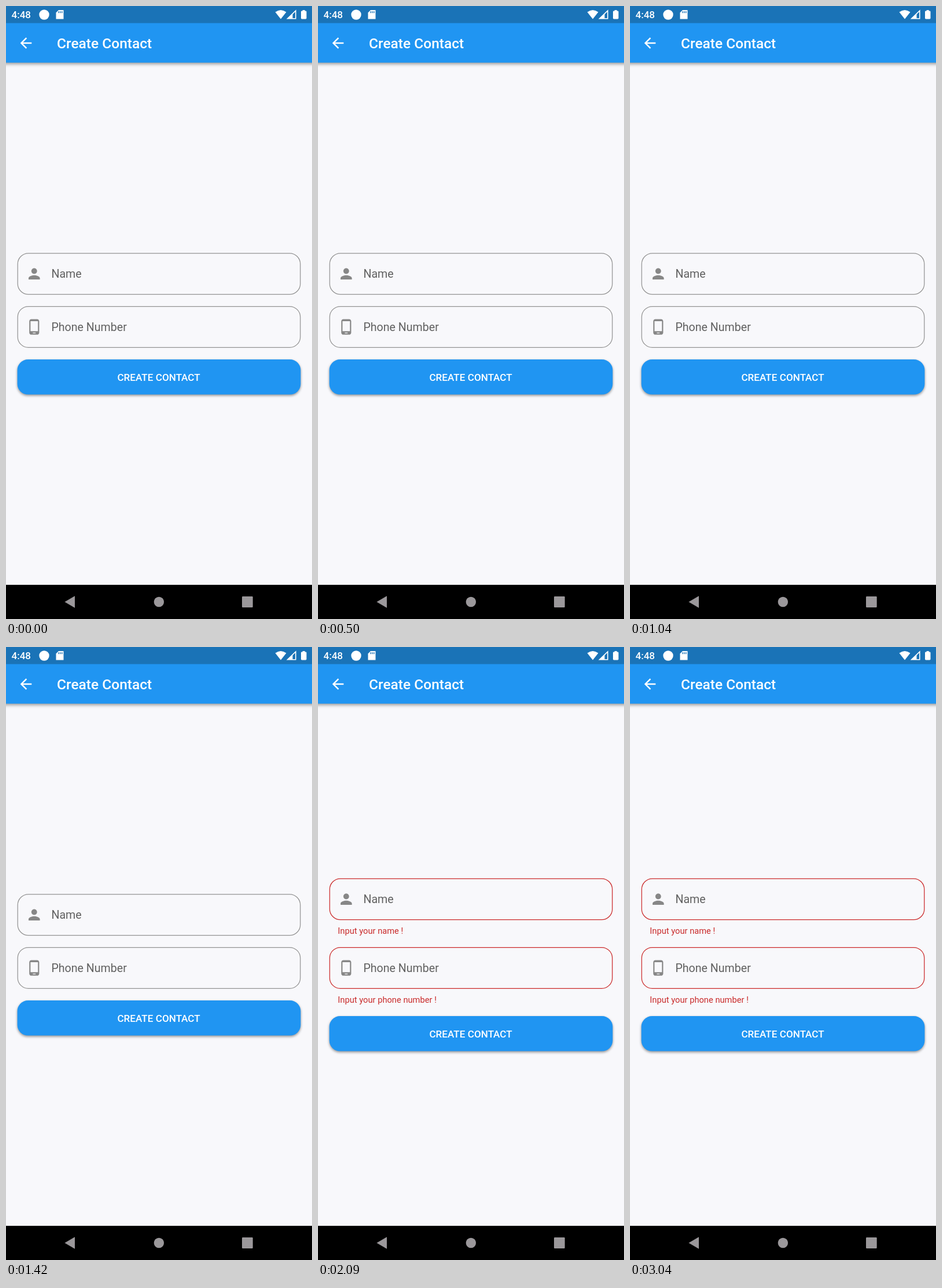
Animation, 529 px wide and 1058 px high, one loop 3210 ms. Source, as an HTML page with a canvas:

```html
<!DOCTYPE html>
<html lang="en">
<head>
<meta charset="utf-8">
<title>Create Contact</title>
<style>
  html, body { margin: 0; width: 100%; height: 100%; overflow: hidden; background: #f8f8fb; }
  canvas { display: block; width: 529px; height: 1058px; }
</style>
</head>
<body>
<canvas id="stage" width="529" height="1058"></canvas>
<script>
const ctx = document.getElementById('stage').getContext('2d');
const W = 529, LOOP = 3210, DP = 1.2245;
const TAP = 1510, RELEASE = 1590;
const BLUE = '#2095f2', GREY = [147, 147, 147], RED = [203, 42, 42];

const icons = {
  back: new Path2D('M20 11H7.83l5.59-5.59L12 4l-8 8 8 8 1.41-1.41L7.83 13H20v-2z'),
  person: new Path2D('M12 12c2.21 0 4-1.79 4-4s-1.79-4-4-4-4 1.79-4 4 1.79 4 4 4zm0 2c-2.67 0-8 1.34-8 4v2h16v-2c0-2.66-5.33-4-8-4z'),
  phone: new Path2D('M16 1H8C6.34 1 5 2.34 5 4v16c0 1.66 1.34 3 3 3h8c1.66 0 3-1.34 3-3V4c0-1.66-1.34-3-3-3zm-2 20h-4v-1h4v1zm3.25-3H6.75V4h10.5v14z')
};

const progress = (t, start, length) => Math.min(1, Math.max(0, (t - start) / length));
const easeOut = p => 1 - (1 - p) ** 2;

function text(str, x, y, size, color, weight = 400, align = 'left') {
  ctx.font = `${weight} ${size}px Roboto, sans-serif`;
  ctx.textAlign = align;
  ctx.fillStyle = color;
  ctx.fillText(str, x, y);
}

function icon(path, cx, cy, color) {
  ctx.save();
  ctx.translate(cx - 12 * DP, cy - 12 * DP);
  ctx.scale(DP, DP);
  ctx.fillStyle = color;
  ctx.fill(path);
  ctx.restore();
}

function polygon(...pts) {
  ctx.beginPath();
  pts.forEach(([x, y]) => ctx.lineTo(x, y));
  ctx.closePath();
}

function disc(x, y, r, color) {
  ctx.fillStyle = color;
  ctx.beginPath();
  ctx.arc(x, y, r, 0, Math.PI * 2);
  ctx.fill();
}

function box(x, y, w, h, r) {
  ctx.beginPath();
  ctx.roundRect(x, y, w, h, r);
}

function shadowFill(color, alpha, blur, dy) {
  ctx.save();
  ctx.shadowColor = `rgba(0,0,0,${alpha})`;
  ctx.shadowBlur = blur;
  ctx.shadowOffsetY = dy;
  ctx.fillStyle = color;
  ctx.fill();
  ctx.restore();
}

function drawStatusBar() {
  ctx.fillStyle = '#1a73b7';
  ctx.fillRect(0, 0, W, 29.5);
  text('4:48', 9.5, 21, 17, '#fff', 500);
  disc(66, 15, 8.7, '#fff');

  // memory card
  ctx.fillStyle = '#fff';
  polygon([91, 7], [99.5, 7], [99.5, 22.5], [86.5, 22.5], [86.5, 11.5]);
  ctx.fill();
  ctx.fillStyle = '#1a73b7';
  [90.5, 93.3, 96.1].forEach(x => ctx.fillRect(x, 9, 1.4, 3.2));

  // wifi
  ctx.fillStyle = '#fff';
  ctx.beginPath();
  ctx.moveTo(475, 22.5);
  ctx.lineTo(465.5, 10.5);
  ctx.quadraticCurveTo(475, 3.5, 484.5, 10.5);
  ctx.closePath();
  ctx.fill();

  // signal
  polygon([486.7, 21.7], [500.8, 21.7], [500.8, 8.2]);
  ctx.strokeStyle = '#fff';
  ctx.lineWidth = 1.6;
  ctx.stroke();
  polygon([486, 22], [495.5, 22], [495.5, 13]);
  ctx.fill();

  // battery
  box(510, 8.5, 9.5, 14, 1.4);
  ctx.fill();
  ctx.fillRect(512.7, 7, 4, 2);
}

function drawAppBar() {
  ctx.beginPath();
  ctx.rect(-10, 20, W + 20, 77.8);
  shadowFill(BLUE, 0.42, 6, 2.5);
  icon(icons.back, 34.5, 64, '#fff');
  text('Create Contact', 88, 73, 24.5, '#fff', 500);
}

function drawField(cy, glyph, label, color) {
  box(20.2, cy - 35.4, 488.6, 70.8, 18.4);
  ctx.strokeStyle = color;
  ctx.lineWidth = 1.25;
  ctx.stroke();
  icon(glyph, 48.8, cy, '#878787');
  text(label, 78.4, cy + 6.8, 19.6, '#616161');
}

function drawError(message, y, p) {
  ctx.globalAlpha = p;
  text(message, 34.3, y - 4.3 * (1 - p), 14.7, '#c92b2b');
  ctx.globalAlpha = 1;
}

function drawButton(y, t) {
  box(19.6, y, 489.8, 60.6, 18.4);
  shadowFill(BLUE, 0.42, 4.5, 2);

  const alpha = 0.24 * progress(t, TAP, 75) * (1 - progress(t, RELEASE + 225, 150));
  if (alpha > 0) {
    ctx.save();
    ctx.clip();
    const radius = 250 * (0.3 + 0.7 * easeOut(progress(t, TAP, 225)));
    disc(W / 2, y + 30.3, radius, `rgba(255,255,255,${alpha})`);
    ctx.restore();
  }
  text('CREATE CONTACT', W / 2 - 0.5, y + 36.6, 17.14, '#fff', 500, 'center');
}

function drawNavBar() {
  const grey = '#9b989b';
  ctx.fillStyle = '#000';
  ctx.fillRect(0, 999, W, 59);
  ctx.fillStyle = grey;
  polygon([101.5, 1028.5], [119, 1018.3], [119, 1038.7]);
  ctx.fill();
  disc(264.4, 1028.5, 8.7, grey);
  box(408, 1019, 18.7, 19, 1.2);
  ctx.fill();
}

function draw(t) {
  const invalid = t >= RELEASE;
  const shift = invalid ? 27 : 0;
  const p = progress(t, RELEASE, 167);
  const border = `rgb(${GREY.map((g, i) => Math.round(g + (RED[i] - g) * p))})`;

  ctx.fillStyle = '#f8f8fb';
  ctx.fillRect(0, 0, W, 1058);
  drawAppBar();
  drawStatusBar();
  drawField(462.3 - shift, icons.person, 'Name', border);
  drawField(553.9, icons.phone, 'Phone Number', border);
  if (invalid) {
    drawError('Input your name !', 495, p);
    drawError('Input your phone number !', 613.5, p);
  }
  drawButton(610 + shift, t);
  drawNavBar();
}

const start = performance.now();
function tick() {
  draw((performance.now() - start) % LOOP);
  requestAnimationFrame(tick);
}
tick();
</script>
</body>
</html>
```
